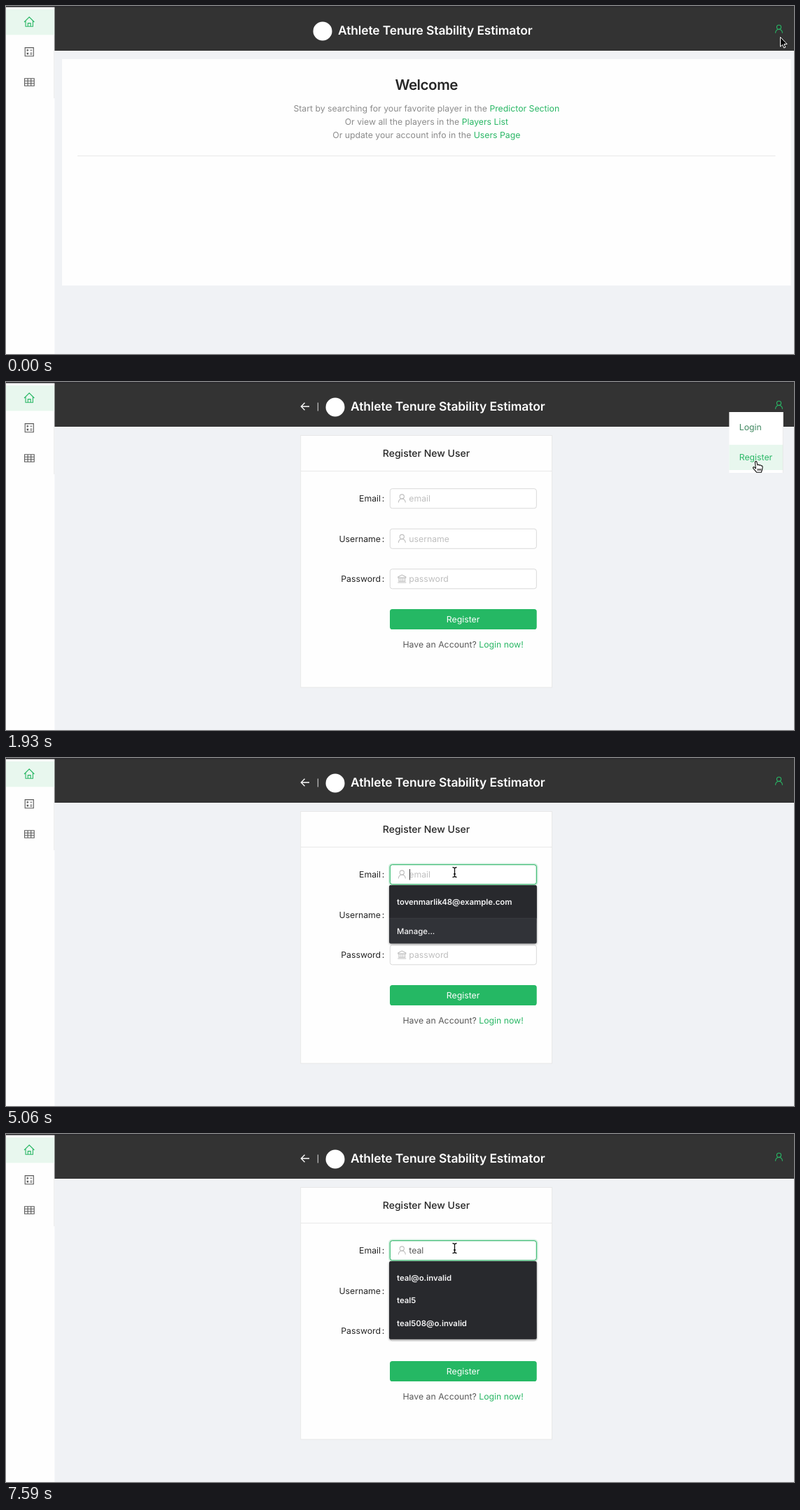
Recreate the animation shown at these times as an HTML page. Size 1125 px wide and 498 px high, loop 8000 ms.

```html
<!DOCTYPE html>
<html lang="en">
<head>
<meta charset="utf-8">
<title>Register form</title>
<style>
  html, body { margin: 0; width: 100%; height: 100%; overflow: hidden; background: #f0f2f5; }
  svg { display: block; width: 1125px; height: 498px; }
  text {
    font: 12.28px Inter, "Open Sans", sans-serif;
    font-optical-sizing: none;
    text-rendering: geometricPrecision;
    white-space: pre;
  }
  .mid { text-anchor: middle; }
  .end { text-anchor: end; }
  .title { font-size: 17.4px; font-weight: 600; letter-spacing: -.005em; fill: #fff; }
  .welcome { font-size: 20.6px; font-weight: 600; letter-spacing: -.022em; fill: #262626; }
  .head { font-size: 14px; font-weight: 500; fill: #262626; }
  .label { fill: #262626; }
  .soft { fill: #8c8c8c; }
  .body { fill: #595959; }
  .hint { fill: #bfbfbf; }
  .link { fill: #29b765; }
  .option { font-size: 11.4px; font-weight: 600; fill: #f4f4f5; }
  .manage { font-weight: 500; }
  .icon { fill: none; stroke-width: 1.1; }
  .field { fill: #fff; stroke: #d9d9d9; }
  .shade { filter: drop-shadow(0 1px 1.5px rgba(0, 0, 0, .4)); }
</style>
</head>
<body>
<svg viewBox="0 0 1125 498">
  <defs>
    <g id="user" class="icon">
      <circle cy="-2.7" r="3.1"/>
      <path d="M-5 5.8C-4.8 2.4-2.6.5 0 .5S4.8 2.4 5 5.8"/>
    </g>
    <g id="bank" class="icon">
      <path d="M-5.5-1.6V-2.8L0-5.6 5.5-2.8V-1.6ZM-6 5.3H6M-5 3.6H5M-4.2-1.6V3.6M-1.4-1.6V3.6M1.4-1.6V3.6M4.2-1.6V3.6"/>
    </g>
    <path id="arrow" d="M0 0V13.6L3.1 10.8 5.2 15.5 7.3 14.6 5.3 10H9.6Z" stroke="#fff" stroke-width="1"/>
    <path id="hand" d="M-1.3 1.2C-1.6-.4.8-.8 1.2.8L2.2 5C3.2 4.2 4.6 4.6 5 5.4 6 4.8 7.2 5.2 7.6 6.2 9 5.8 9.6 7 9.4 8.4L8.8 12 7.6 15.5H1L-3.8 9.8C-5 8.2-3.2 7.2-2 8.4L-.2 10ZM2.8 10.2V13M4.8 10.2V13M6.8 10.2V13"
      fill="#fff" stroke="#111" stroke-width="1.1" stroke-linejoin="round"/>
    <g id="beam" fill="none">
      <path d="M-3-7Q0-7 0-5Q0-7 3-7M0-5V5M-3 7Q0 7 0 5Q0 7 3 7M-1.5 2.5H1.5" stroke="#fff" stroke-width="2.6"/>
      <path d="M-3-7Q0-7 0-5Q0-7 3-7M0-5V5M-3 7Q0 7 0 5Q0 7 3 7M-1.5 2.5H1.5" stroke="#111" stroke-width="1.3"/>
    </g>
  </defs>

  <rect width="1125" height="498" fill="#f0f2f5"/>
  <rect width="69.4" height="498" fill="#fefefe"/>
  <rect y="5" width="69.4" height="36.4" fill="#e8f7ee"/>
  <path d="M68.8 42V132" stroke="#e8e8e8"/>
  <rect x="69.4" width="1055.6" height="64" fill="#333"/>
  <rect width="1125" height="1.6" fill="#2b2a2e"/>

  <path class="icon" stroke="#29b765" d="M26 23 33.2 15.8 40.4 23M28 21.5V29.3H38.4V21.5M31.3 29V24.6H35.1V29"/>
  <path class="icon" stroke="#595959" d="M27.2 59.6H39.3V71.8H27.2ZM29.3 63.2H32.3M30.8 61.7V64.7M34.5 63.2H37.3M29.7 67 32 69.3M32 67 29.7 69.3M34.5 67.2H37.3M34.5 69.3H37.3"/>
  <path class="icon" stroke="#595959" d="M26.6 103.7H40.2V114.3H26.6ZM26.6 107.2H40.2M26.6 110.8H40.2M31.1 103.7V114.3M35.7 103.7V114.3"/>
  <use href="#user" x="1103.5" y="33" stroke="#29b765"/>

  <g id="brand">
    <circle cx="452" cy="36" r="13.5" fill="#fff"/>
    <text class="title" x="474" y="40.5">Athlete Tenure Stability Estimator</text>
  </g>

  <g id="home">
    <rect x="80" y="76" width="1040.5" height="324" fill="#fefefe"/>
    <text class="welcome mid" x="600.2" y="119.5">Welcome</text>
    <text class="soft mid" x="600.3" y="151">Start by searching for your favorite player in the <tspan class="link">Predictor Section</tspan></text>
    <text class="soft mid" x="600.3" y="170">Or view all the players in the <tspan class="link">Players List</tspan></text>
    <text class="soft mid" x="600.3" y="189">Or update your account info in the <tspan class="link">Users Page</tspan></text>
    <path d="M102 214.5H1098.5" stroke="#e8e8e8"/>
  </g>

  <g id="form">
    <path d="M433 35H421.5M426.5 29.8 421.3 35 426.5 40.2" fill="none" stroke="#fff" stroke-width="1.3"/>
    <path d="M445.3 29.5V41.5" stroke="#ddd"/>
    <rect x="420.7" y="76.5" width="358.8" height="360.5" fill="#fefefe" stroke="#e8e8e8"/>
    <path d="M421 127.5H779" stroke="#e8e8e8"/>
    <text class="head mid" x="600" y="107">Register New User</text>
    <g id="fields"></g>
    <rect x="548" y="325" width="209.7" height="29" rx="3.6" fill="#25b864"/>
    <text class="mid" x="652.6" y="344" fill="#fff">Register</text>
    <text class="body mid" x="652.6" y="380">Have an Account? <tspan class="link">Login now!</tspan></text>
    <g id="focus" fill="none" stroke="#25b864">
      <rect x="547" y="151.4" width="211.6" height="30.7" rx="4.4" stroke-width="2" opacity=".2"/>
      <rect x="548.3" y="152.7" width="209" height="28.1" rx="3.2"/>
    </g>
    <text id="typed" class="body" x="575.3" y="171"></text>
    <path id="caret" d="M0 159V174.5" stroke="#333"/>
    <g id="saved">
      <rect class="shade" x="547" y="182" width="210.7" height="83.5" rx="2.5" fill="#313338"/>
      <path d="M547 229V184.5Q547 182 549.5 182H755.2Q757.7 182 757.7 184.5V229Z" fill="#28292d"/>
      <path d="M547 229.3H757.7" stroke="#3b3d42" stroke-width=".8"/>
      <text class="option" x="558" y="210">tovenmarlik48@example.com</text>
      <text class="option manage" x="558" y="252">Manage...</text>
    </g>
    <g id="matches">
      <rect class="shade" x="547" y="182" width="210.7" rx="2.5" fill="#28292d"/>
    </g>
  </g>

  <g id="menu">
    <rect width="77.2" height="87" fill="#fff"/>
    <rect id="mark" width="76.7" height="36.2" fill="#e8f7ee"/>
    <path d="M76.9 0V87" stroke="#e4e4e4" stroke-width=".8"/>
    <text id="login" x="14.3" y="26.3">Login</text>
    <text id="register" x="14.3" y="69.3">Register</text>
  </g>
  <use id="cursor"/>
</svg>
<script>
const LOOP = 8000;
const GREEN = '#29b765', GREY = '#595959';
const $ = id => document.getElementById(id);

// Every table row starts with the time in ms from which it holds.
const pointer = [
  [0, 'arrow', 1105.5, 44.5], [150, 'hand', 1104, 36], [300, 'hand', 1103, 30],
  [890, 'hand', 1096, 56], [1040, 'hand', 1079, 94], [1190, 'hand', 1070.7, 113.8],
  [2380, 'hand', 1058, 116], [2530, 'arrow', 850, 130], [2670, 'arrow', 657.5, 145.5],
  [2820, 'beam', 640.5, 163.5]
];
// time, opacity, vertical scale
const menuSteps = [
  [0, 0, .8], [300, .45, .89], [450, .92, .98], [590, 1, 1], [2670, .56, .908], [2820, 0, .8]
];
const typing = [[0, ''], [5510, 't'], [5650, 'te'], [5800, 'tea'], [6100, 'teal']];
const blink = [
  [0, 0], [2970, 1], [3560, 0], [4010, 1], [4460, 0], [5060, 1], [6550, 0], [6990, 1], [7590, 0]
];
const popup = [[0, 'none', 0], [3120, 'saved', 0], [5510, 'matches', 5], [5650, 'matches', 3]];
const options = ['teal@o.invalid', 'teal5', 'teal508@o.invalid', 'tulip@o.invalid', 'tango4'];

const at = (steps, t) => steps.findLast(row => row[0] <= t);
const show = (id, on) => { $(id).style.display = on ? '' : 'none'; };
function set(id, attrs) {
  for (const name in attrs) $(id).setAttribute(name, attrs[name]);
}

$('fields').innerHTML = [['Email', 'user'], ['Username', 'user'], ['Password', 'bank']]
  .map(([name, icon], i) => {
    const y = 152.7 + i * 57.5;
    return `<text class="label end" x="535" y="${y + 18.3}">${name}</text>
      <text class="label" x="536.8" y="${y + 18.3}">:</text>
      <rect class="field" x="548.3" y="${y}" width="209" height="28.1" rx="3.2"/>
      <use href="#${icon}" x="565.3" y="${y + 14}" stroke="#bfbfbf"/>
      <text class="hint" id="hint${i}" x="575.3" y="${y + 18.3}">${name.toLowerCase()}</text>`;
  }).join('');
$('matches').innerHTML += options
  .map((s, i) => `<text class="option" x="558" y="${210 + i * 32.4}">${s}</text>`).join('');

function draw(t) {
  const onForm = t >= 1930;
  show('home', !onForm);
  show('form', onForm);
  set('brand', { transform: `translate(${onForm ? 18 : 0})` });

  const [, opacity, scale] = at(menuSteps, t);
  set('menu', { opacity, transform: `translate(1032.4 43) scale(1 ${scale})` });
  set('mark', { y: onForm ? 46.8 : 3.6 });
  set('login', { fill: t < 1930 ? GREEN : t < 2080 ? '#418861' : GREY });
  set('register', { fill: t < 1040 ? GREY : GREEN });

  const [, kind, x, y] = at(pointer, t);
  set('cursor', { href: '#' + kind, x, y });

  const text = at(typing, t)[1];
  $('typed').textContent = text;
  show('hint0', !text);
  show('focus', t >= 2970);
  show('caret', at(blink, t)[1]);
  const width = text && onForm ? $('typed').getComputedTextLength() : 0;
  set('caret', { transform: `translate(${Math.round(575.8 + width) + .5})` });

  const [, list, rows] = at(popup, t);
  show('saved', list === 'saved');
  show('matches', list === 'matches');
  $('matches').firstElementChild.setAttribute('height', 14.5 + rows * 32.4);
  $('matches').querySelectorAll('text').forEach((el, i) => {
    el.style.display = i < rows ? '' : 'none';
  });
}

const start = performance.now();
function frame() {
  draw((performance.now() - start) % LOOP);
  requestAnimationFrame(frame);
}
frame();
</script>
</body>
</html>
```
